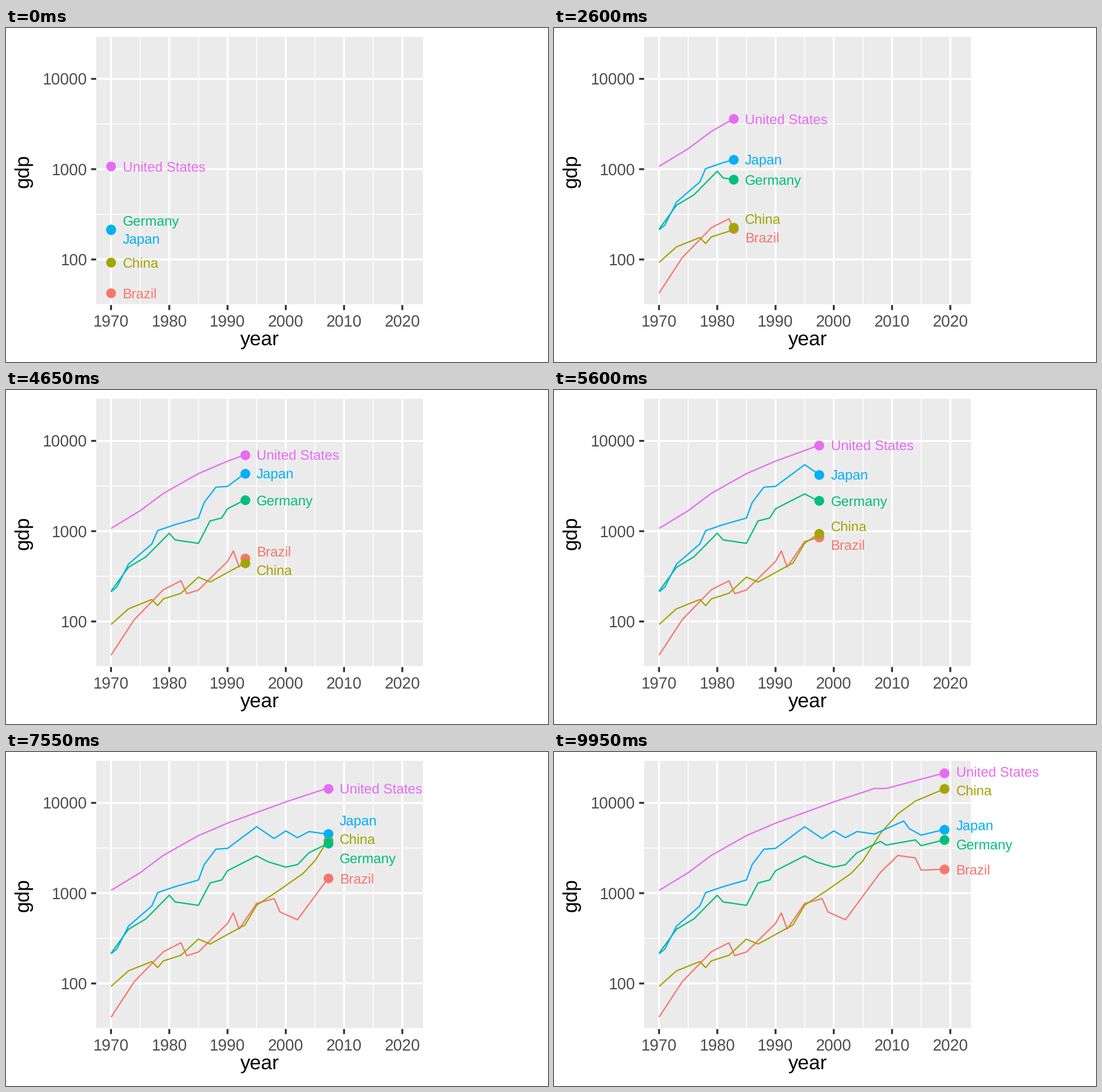
A matplotlib script for the animation above (10 s loop, 900x556 px).

```python
import matplotlib.pyplot as plt
import numpy as np
from matplotlib.animation import FuncAnimation
from matplotlib.patches import Rectangle

plt.rcParams["font.family"] = "Liberation Sans"
plt.rcParams["text.hinting"] = "none"

W, H, DPI = 900, 556, 64
PX = 72 / DPI                       # points per pixel
LEFT, RIGHT, TOP, BOTTOM = 149.7, 692.4, 14.6, 461.2
FRAMES, YEARS, STEPS_PER_YEAR = 200, 49, 4
LABEL_GAP = 30.8


def x_of(year):
    return 174.4 + (year - 1970) * 9.673


def y_of(gdp):
    return 84.7 + (4 - np.log10(gdp)) * 150.3


fig = plt.figure(figsize=(W / DPI, H / DPI), dpi=DPI, facecolor="white")
ax = fig.add_axes([0, 0, 1, 1])
ax.set_xlim(0, W)
ax.set_ylim(H, 0)
ax.axis("off")


def line(xs, ys, color, width, z):
    return ax.plot(xs, ys, color=color, lw=width * PX, zorder=z, snap=False,
                   solid_capstyle="butt", solid_joinstyle="round")[0]


def text(x, y, s, size, color, **kw):
    return ax.text(x, y, s, fontsize=size * PX, color=color,
                   va="baseline", **kw)


def vline(year, width, z):
    line([x_of(year)] * 2, [TOP, BOTTOM], "white", width, z)


def hline(gdp, width, z):
    line([LEFT, RIGHT], [y_of(gdp)] * 2, "white", width, z)


# Panel, grid and axes
ax.add_patch(Rectangle((LEFT, TOP), RIGHT - LEFT, BOTTOM - TOP,
                       fc="#EBEBEB", ec="none", zorder=0, snap=False))
for year in range(1975, 2020, 10):
    vline(year, 1.6, 1)
for power in (1.5, 2.5, 3.5):
    hline(10 ** power, 1.6, 1)
for year in range(1970, 2021, 10):
    x = x_of(year)
    vline(year, 3.2, 2)
    line([x, x], [BOTTOM, BOTTOM + 8.3], "#333333", 3.2, 2)
    text(x, 498, str(year), 26.67, "#4D4D4D", ha="center")
for gdp in (100, 1000, 10000):
    y = y_of(gdp)
    hline(gdp, 3.2, 2)
    line([LEFT - 8.3, LEFT], [y, y], "#333333", 3.2, 2)
    text(135, y + 10.3, str(gdp), 26.67, "#4D4D4D", ha="right")
text(421, 528.5, "year", 33.33, "black", ha="center")
text(38, 238, "gdp", 33.33, "black", ha="center", rotation=90,
     rotation_mode="anchor")


class Country:
    """A curve through turning points (years since 1970, GDP in billions)."""

    def __init__(self, name, color, order, *turns):
        self.ts, gdp = np.array(turns).T
        self.ys = y_of(gdp)
        self.path = line([], [], color, 2.2, 3 + order / 10)
        self.dot, = ax.plot([], [], "o", color=color, ms=16.3 * PX, mew=0,
                            zorder=4 + order / 10, snap=False)
        self.label = text(0, 0, name, 22.9, color, ha="left", zorder=5)

    def move(self, t):
        self.y = np.interp(t, self.ts, self.ys)
        past = self.ts < t
        self.path.set_data(x_of(1970 + np.append(self.ts[past], t)),
                           np.append(self.ys[past], self.y))
        self.dot.set_data([x_of(1970 + t)], [self.y])


countries = [
    Country("Brazil", "#F8766D", 0,
            (0, 42.3), (4, 105), (9, 225), (12, 282), (13, 203), (15, 223),
            (20, 462), (21, 603), (22, 401), (25, 769), (28, 870), (29, 620),
            (32, 508), (38, 1696), (41, 2616), (44, 2456), (45, 1800),
            (49, 1840)),
    Country("China", "#A3A500", 1,
            (0, 92.6), (3, 138), (7, 175), (8, 150), (9, 178), (12, 205),
            (15, 310), (17, 273), (23, 445), (25, 735), (29, 1094),
            (33, 1660), (35, 2286), (38, 4594), (41, 7552), (44, 10476),
            (49, 14280)),
    Country("Germany", "#00BF7D", 2,
            (0, 216), (3, 398), (6, 520), (10, 950), (11, 800), (15, 733),
            (17, 1298), (19, 1400), (20, 1772), (25, 2586), (27, 2220),
            (30, 1943), (32, 2069), (34, 2809), (38, 3745), (39, 3411),
            (44, 3889), (45, 3358), (49, 3900)),
    Country("Japan", "#00B0F6", 3,
            (0, 213), (1, 240), (3, 432), (7, 721), (8, 1014), (11, 1180),
            (15, 1399), (16, 2079), (18, 3072), (20, 3133), (25, 5449),
            (28, 4033), (30, 4888), (32, 4115), (34, 4815), (37, 4515),
            (42, 6300), (43, 5156), (45, 4390), (49, 5082)),
    Country("United States", "#E76BF3", 4,
            (0, 1073), (5, 1685), (9, 2627), (15, 4339), (20, 5963),
            (30, 10252), (37, 14452), (39, 14449), (49, 21433)),
]


def spread(ys):
    """Push sorted positions apart to LABEL_GAP, keeping each cluster's mean."""
    groups = []
    for i, y in enumerate(ys):
        total, n = y - i * LABEL_GAP, 1
        while groups and groups[-1][0] / groups[-1][1] > total / n:
            t, m = groups.pop()
            total, n = total + t, n + m
        groups.append((total, n))
    base = [t / n for t, n in groups for _ in range(n)]
    return [b + i * LABEL_GAP for i, b in enumerate(base)]


def update(frame):
    # Time advances in quarter years
    t = round(frame * YEARS * STEPS_PER_YEAR / (FRAMES - 1)) / STEPS_PER_YEAR
    for c in countries:
        c.move(t)
    ranked = sorted(countries, key=lambda c: c.y)
    for c, y in zip(ranked, spread([c.y for c in ranked])):
        c.label.set_position((x_of(1970 + t) + 19.2, y + 8.2))
    return []


anim = FuncAnimation(fig, update, frames=FRAMES, interval=50,
                     repeat=True, repeat_delay=0, blit=False)
plt.show()
```
